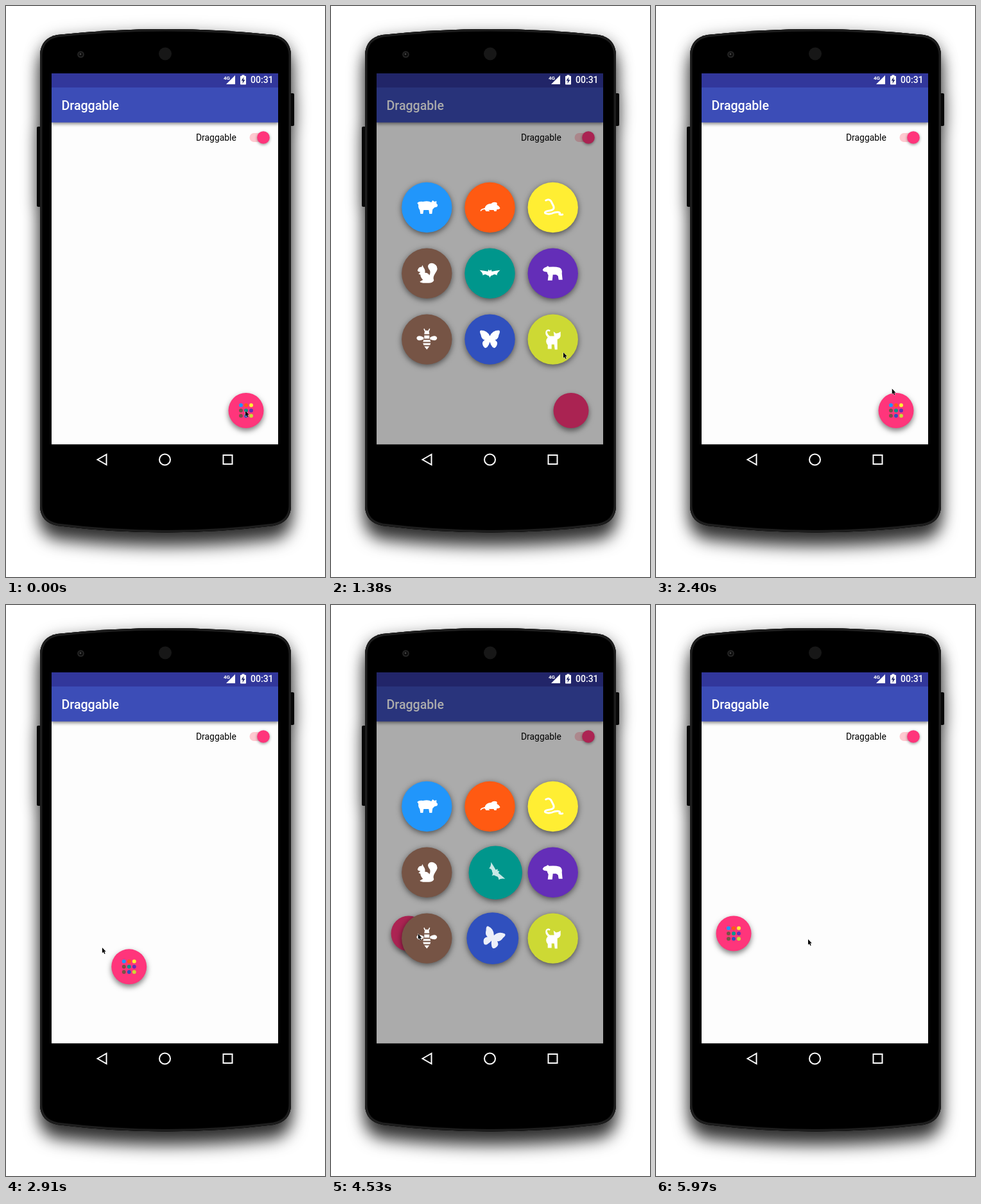
An HTML page with a canvas that plays this animation: 497x890 px, repeating every 6 s.

```html
<!DOCTYPE html>
<html lang="en">
<head>
<meta charset="utf-8">
<title>Draggable menu</title>
<style>
html, body { margin: 0; width: 100%; height: 100%; overflow: hidden; background: #fff; }
canvas { display: block; width: 497px; height: 890px; }
</style>
</head>
<body>
<canvas id="stage" width="497" height="890"></canvas>
<script>
const ctx = document.getElementById('stage').getContext('2d');
const LOOP = 6000, FLY = 320, TOTAL = 640, BIG = 39.2, DOT = 3;
const PINK = '#ff357b';

const mirror = (half) => {
  const path = new Path2D(half);
  path.addPath(new Path2D(half), new DOMMatrix([-1, 0, 0, 1, 0, 0]));
  return path;
};

// Each icon is drawn around its own centre.
const items = [
  { color: '#2196fb', icon: new Path2D('M-15-7Q-12-10-6-9Q2-11 7-8L9-11L12-9L15-10V-6L17-4L16-1L12 0L9 3L8 10H4L3 4H-5L-6 10H-10L-11 4Q-14 0-13-4Z') },
  { color: '#ff5a12', icon: new Path2D('M-15 5Q-14 2-8 1Q-6-6 2-6Q5-9 9-8Q12-8 11-4Q15-2 16 1Q15 3 11 3L10 6H7L6 4H-2L0 6H-6L-8 3Q-12 3-14 6Z') },
  { color: '#ffee33', line: true, icon: new Path2D('M-11-11Q-6-14-3-10Q-1-6 1-2Q3 4-5 5Q-14 6-12 9Q-6 12 2 8Q10 6 11 9Q8 12 15 11') },
  { color: '#765445', icon: new Path2D('M-3 15Q-9 15-11 13L-6 10Q-10 6-10 2L-13 1L-10-2Q-16-3-14-6Q-12-11-8-10L-7-13L-5-9Q-2-5-3-1Q2-1 4 3Q7-3 3-7Q0-12 4-15Q9-18 14-13Q19-8 13 0Q9 6 11 11Q9 15 3 15Z') },
  { color: '#00968c', icon: mirror('M0-4L2-6L3-3Q8-4 16-5Q11-1 11 3Q7 0 4 3Q1 3 0 7Z') },
  { color: '#642eb8', icon: new Path2D('M-16-5Q-15-9-10-10Q-8-13-6-10Q4-11 10-9Q15-7 14 0L15 10H9L8 4L5 2H0L-1 11H-8L-7 3Q-9 0-9-2L-14-3Z') },
  { color: '#765445', icon: mirror('M0-14Q4-13 4-8H0ZM1-12L4-17L5-16L3-11ZM0-6H4V-1H0ZM5-3Q14-8 16-2Q15 4 5 0ZM0 1H5L6 4H0ZM0 6H6L5 9H0ZM0 11H4L0 16Z') },
  { color: '#3050be', icon: mirror('M0-5Q4-14 14-14Q17-13 14-7Q13 0 8 1Q13 4 11 9Q8 16 4 12Q1 8 0 4Z') },
  { color: '#cdd934', icon: new Path2D('M-8-3Q-13-8-11-13Q-8-17-4-14L-5-12Q-9-14-9-11Q-8-7-5-5H2L1-12L5-9L9-10L12-12V-5Q11-1 7 0V16H3L2 8H-2V15H-8V9Q-13 3-8-3Z') }
].map((item, i) => ({
  ...item,
  x: 149.3 + 98.2 * (i % 3),
  y: 314 + 102.8 * Math.floor(i / 3),
  dx: 8 * (i % 3 - 1),
  dy: 8.2 * (Math.floor(i / 3) - 1)
}));

// Start times and the delay of each item, in grid order.
const phases = [
  { at: 60, open: true, delay: [0, 160, 80, 280, 40, 200, 320, 120, 240] },
  { at: 1596, open: false, delay: [211, 0, 165, 40, 127, 78, 331, 40, 0] },
  { at: 3960, open: true, delay: [120, 40, 240, 0, 320, 160, 80, 280, 200] },
  { at: 5287, open: false, delay: [160, 240, 21, 80, 200, 120, 320, 0, 280] }
];
const fabKeys = [[2560, 374, 630.5], [2910, 192, 564], [3180, 121, 512]];
const mouseKeys = [
  [400, 373, 631], [1000, 362, 540], [2260, 362, 540], [2480, 371, 628],
  [2910, 150, 534], [3160, 129, 512], [4500, 129, 512], [5000, 237, 521]
];

const clamp = (v) => Math.max(0, Math.min(1, v));

function bezier(x1, y1, x2, y2) {
  const at = (a, b, t) => 3 * (1 - t) * (1 - t) * t * a + 3 * (1 - t) * t * t * b + t * t * t;
  return (x) => {
    if (x <= 0 || x >= 1) return clamp(x);
    let lo = 0, hi = 1;
    for (let i = 0; i < 24; i++) {
      const mid = (lo + hi) / 2;
      if (at(x1, x2, mid) < x) lo = mid; else hi = mid;
    }
    return at(y1, y2, lo);
  };
}
const backIn = bezier(0.6, -0.28, 0.735, 0.045);
const backOut = bezier(0.175, 0.885, 0.32, 1.275);

function along(keys, t) {
  if (t <= keys[0][0]) return { x: keys[0][1], y: keys[0][2] };
  for (let i = 1; i < keys.length; i++) {
    const [t0, x0, y0] = keys[i - 1], [t1, x1, y1] = keys[i];
    if (t < t1) {
      const k = (t - t0) / (t1 - t0);
      return { x: x0 + (x1 - x0) * k, y: y0 + (y1 - y0) * k };
    }
  }
  const end = keys[keys.length - 1];
  return { x: end[1], y: end[2] };
}

function rect(x, y, w, h, color) {
  ctx.fillStyle = color;
  ctx.fillRect(x, y, w, h);
}

function circle(x, y, r, color) {
  ctx.beginPath();
  ctx.arc(x, y, Math.max(0, r), 0, Math.PI * 2);
  ctx.fillStyle = color;
  ctx.fill();
}

function round(x, y, w, h, r, color) {
  ctx.beginPath();
  ctx.roundRect(x, y, w, h, r);
  ctx.fillStyle = color;
  ctx.fill();
}

function text(str, x, y, size, weight, color) {
  ctx.font = `${weight} ${size}px Roboto, sans-serif`;
  ctx.fillStyle = color;
  ctx.fillText(str, x, y);
}

function shadowed(alpha, blur, dy, draw) {
  ctx.save();
  ctx.shadowColor = `rgba(0,0,0,${alpha})`;
  ctx.shadowBlur = blur;
  ctx.shadowOffsetY = dy;
  draw();
  ctx.restore();
}

const body = new Path2D('M53 76Q54 50 80 45Q249 27 417 45Q443 50 444 76V780Q443 805 417 810Q249 831 80 810Q54 805 53 780Z');

function drawPhone() {
  rect(0, 0, 497, 890, '#fff');
  shadowed(0.75, 26, 22, () => { ctx.fillStyle = '#000'; ctx.fill(body); });
  shadowed(0.35, 24, 4, () => {
    round(48, 188, 8, 125, 2, '#0a0a0a');
    round(441, 136, 8, 51, 2, '#0a0a0a');
    ctx.fillStyle = '#000';
    ctx.fill(body);
  });
  ctx.save();
  ctx.clip(body);
  ctx.strokeStyle = '#1d1d1d';
  ctx.lineWidth = 7;
  ctx.stroke(body);
  ctx.restore();
  circle(116.5, 75.5, 5.3, '#252525');
  circle(116.5, 75.5, 3.3, '#0b0b0b');
  circle(116, 75, 1.4, '#444');
  circle(248, 74.5, 10, '#171717');
  ctx.strokeStyle = '#fff';
  ctx.lineWidth = 2;
  ctx.stroke(new Path2D('M142.5 707L156.5 699V715Z'));
  ctx.beginPath();
  ctx.arc(247.5, 707, 8.5, 0, Math.PI * 2);
  ctx.stroke();
  ctx.strokeRect(338.5, 700, 14, 14);
}

function drawApp() {
  rect(71, 105, 353, 578.5, '#fdfdfd');
  shadowed(0.45, 5, 2, () => rect(71, 127, 353, 54.5, '#3c4db7'));
  rect(71, 105, 353, 22, '#32379b');
  text('Draggable', 86.5, 162, 19.6, 500, '#fff');
  round(379.5, 198, 29, 14, 7, '#ffc9d0');
  shadowed(0.4, 4, 1.5, () => circle(401, 205, 9.8, PINK));
}

function drawStatus() {
  text('4G', 339, 115, 8, 700, '#fff');
  ctx.fill(new Path2D('M343 122L357 108V122Z'));
  rect(367.5, 107.5, 4, 2, '#fff');
  round(365, 109, 9, 13.5, 1, '#fff');
  ctx.fillStyle = '#28306f';
  ctx.fill(new Path2D('M370.5 110.5L366.5 116.5H369L368.5 121L372.5 115H370Z'));
  text('00:31', 381, 120.3, 14, 500, '#fff');
  text('Draggable', 296, 210, 13.9, 400, '#000');
}

function drawItem(item, fab, q, alpha, color) {
  const homeX = fab.x + item.dx, homeY = fab.y + item.dy;
  const r = DOT + (BIG - DOT) * q.size;
  const x = q.x(homeX, item.x), y = q.y(homeY, item.y);
  shadowed(0.55, 10, 2.5, () => circle(x, y, r, color));
  ctx.save();
  ctx.translate(x, y);
  ctx.rotate(q.turn * Math.PI * 4);
  ctx.scale(r / BIG, r / BIG);
  ctx.globalAlpha = alpha;
  if (item.line) {
    ctx.strokeStyle = '#fff';
    ctx.lineWidth = 3;
    ctx.lineCap = ctx.lineJoin = 'round';
    ctx.stroke(item.icon);
  } else {
    ctx.fillStyle = '#fff';
    ctx.fill(item.icon);
  }
  ctx.restore();
}

// A throw: steady across, slowing to its peak in height.
function flight(open, k) {
  const p = open ? backOut(k) : backIn(k);
  const lift = 2 * p - p * p;
  const mix = (s) => (home, place) => open ? home + (place - home) * s : place + (home - place) * s;
  return { size: open ? p : 1 - p, turn: open ? p - 1 : -p, x: mix(p), y: mix(lift) };
}

function drawCursor({ x, y }) {
  ctx.save();
  ctx.translate(x, y);
  const arrow = new Path2D('M0 0V8.5L1.9 6.9L3.4 10L4.7 9.4L3.3 6.3H5.8Z');
  ctx.strokeStyle = 'rgba(255,255,255,.75)';
  ctx.lineWidth = 1;
  ctx.stroke(arrow);
  ctx.fillStyle = '#000';
  ctx.fill(arrow);
  ctx.restore();
}

function draw(t) {
  const phase = phases.filter((p) => p.at <= t).pop() || { at: 0, open: false, delay: [], idle: true };
  const fab = along(fabKeys, t);
  const progress = phase.idle ? 1 : clamp((t - phase.at) / TOTAL);
  const eased = (1 - Math.cos(Math.PI * progress)) / 2;
  const dim = 0.333 * (phase.open ? eased : 1 - eased);

  drawPhone();
  ctx.save();
  ctx.beginPath();
  ctx.rect(71, 105, 353, 578.5);
  ctx.clip();
  drawApp();
  shadowed(0.5, 9, 4, () => circle(fab.x, fab.y, 27.5, PINK));

  const steps = items.map((_, i) => phase.idle ? 1 : clamp((t - phase.at - phase.delay[i]) / FLY));
  const isHome = (k) => phase.open ? k === 0 : k === 1;
  items.forEach((item, i) => {
    if (isHome(steps[i])) circle(fab.x + item.dx, fab.y + item.dy, DOT, item.color);
  });
  rect(71, 105, 353, 578.5, `rgba(0,0,0,${dim})`);
  drawStatus();
  items.forEach((item, i) => {
    const k = steps[i];
    if (isHome(k)) return;
    const pressed = i === 7 && t > 5200;
    drawItem(item, fab, flight(phase.open, k), phase.open ? k : 1 - k, pressed ? '#1c9aca' : item.color);
  });
  drawCursor(along(mouseKeys, t));
  ctx.restore();
}

function frame() {
  draw(performance.now() % LOOP);
  requestAnimationFrame(frame);
}
frame();
</script>
</body>
</html>
```
